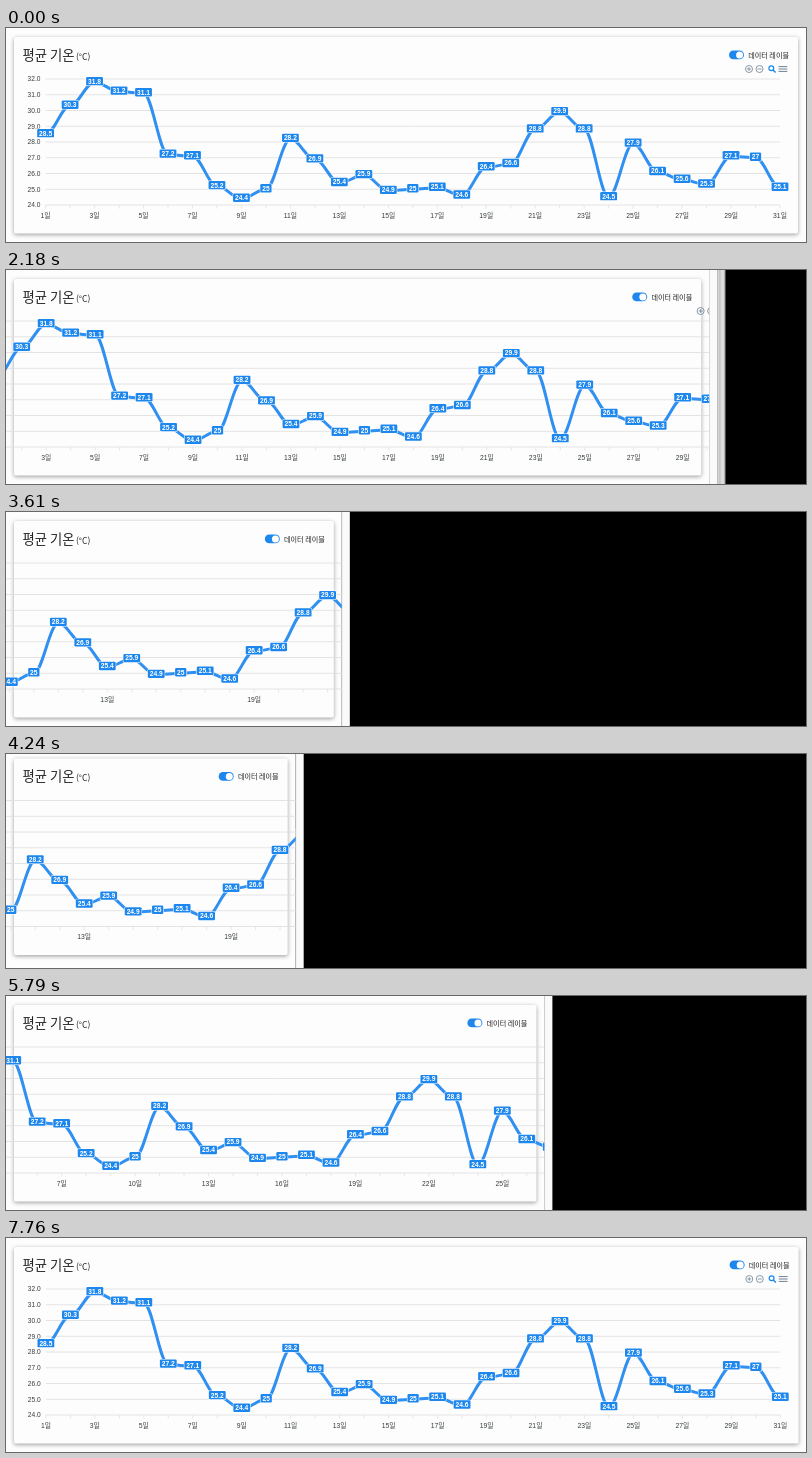
Animation, 800 px wide and 214 px high, one loop 7790 ms. Source, as an HTML page with a canvas:

```html
<!DOCTYPE html>
<html lang="ko">
<head>
<meta charset="utf-8">
<style>
html, body { margin: 0; width: 100%; height: 100%; overflow: hidden; background: #000; }
canvas { display: block; }
</style>
</head>
<body>
<canvas id="stage" width="800" height="214"></canvas>
<script>
const c = document.getElementById('stage').getContext('2d');
const LOOP = 7790, TAU = Math.PI * 2;
const SANS = '"Liberation Sans", "Noto Sans CJK KR", "Noto Sans CJK", sans-serif';
const KOREAN = '"Noto Sans CJK KR", "Noto Sans CJK", sans-serif';
const BLUE = '#1e87ee', GREY = '#6e8192';

const temps = [28.5, 30.3, 31.8, 31.2, 31.1, 27.2, 27.1, 25.2, 24.4, 25, 28.2, 26.9, 25.4, 25.9, 24.9, 25,
  25.1, 24.6, 26.4, 26.6, 28.8, 29.9, 28.8, 24.5, 27.9, 26.1, 25.6, 25.3, 27.1, 27, 25.1];
const STEP = 24.48;
const px = i => 39.6 + STEP * i;
const py = v => 177 - (v - 24) * 15.75;

// Right edge of the card over time: [ms, x]
const edge = [[0, 792], [820, 792], [1580, 762], [1700, 759], [2360, 659], [2670, 558], [3150, 474],
  [3610, 328], [3940, 289], [4350, 281], [4730, 284], [5090, 292], [5520, 429], [6300, 703],
  [6420, 722], [7080, 792.6], [LOOP, 792.6]];

// Monotone cubic interpolation
const slope = i => (edge[i + 1][1] - edge[i][1]) / (edge[i + 1][0] - edge[i][0]);
function tangent(i) {
  if (i === 0 || i === edge.length - 1) return 0;
  const a = slope(i - 1), b = slope(i);
  return a * b > 0 ? 2 * a * b / (a + b) : 0;
}
function edgeAt(t) {
  let i = 0;
  while (i < edge.length - 2 && t >= edge[i + 1][0]) i++;
  const [t0, a] = edge[i], [t1, b] = edge[i + 1], h = t1 - t0, s = (t - t0) / h;
  const ease = s * s * (3 - 2 * s);
  return a + (b - a) * ease + h * s * (1 - s) * ((1 - s) * tangent(i) - s * tangent(i + 1));
}

function rect(x, y, w, h, color) {
  c.fillStyle = color;
  c.fillRect(x, y, w, h);
}
function box(x, y, w, h, r, color) {
  c.fillStyle = color;
  c.beginPath();
  c.roundRect(x, y, w, h, r);
  c.fill();
}
function text(s, x, y, font, color, align = 'left') {
  c.font = font;
  c.fillStyle = color;
  c.textAlign = align;
  c.fillText(s, x, y);
}
function line(color, width, ...pts) {
  c.strokeStyle = color;
  c.lineWidth = width;
  c.beginPath();
  pts.forEach(([x, y]) => c.lineTo(x, y));
  c.stroke();
}
function ring(x, y, r, color, width) {
  c.strokeStyle = color;
  c.lineWidth = width;
  c.beginPath();
  c.arc(x, y, r, 0, TAU);
  c.stroke();
}

function card(right) {
  c.save();
  c.shadowColor = 'rgba(0,0,0,.38)';
  c.shadowBlur = 4;
  c.shadowOffsetY = 1.2;
  box(8, 9, right - 8, 196.5, 2, '#fdfdfd');
  c.restore();
  text('평균 기온', 16.5, 31.8, '500 13.3px ' + KOREAN, '#222');
  text('(°C)', 70, 31.5, '400 8.5px ' + KOREAN, '#222');
  box(right - 69, 22.6, 15, 8.6, 4.3, BLUE);
  c.fillStyle = '#fff';
  c.beginPath();
  c.arc(right - 58.4, 26.9, 3.5, 0, TAU);
  c.fill();
  text('데이터 레이블', right - 49.8, 29.5, '500 7.1px ' + KOREAN, '#222');
}

function toolbar() {
  for (const x of [743, 753.5]) {
    ring(x, 41, 3.5, GREY, 0.8);
    line(GREY, 0.8, [x - 1.9, 41], [x + 1.9, 41]);
  }
  line(GREY, 0.8, [743, 39.1], [743, 42.9]);
  ring(765.3, 40.2, 2.4, '#1688ee', 1.2);
  line('#1688ee', 1.4, [767, 41.9], [769.6, 44.4]);
  for (const y of [38.6, 41, 43.4]) line(GREY, 1, [772.5, y], [781.3, y]);
}

function chart(every) {
  for (let v = 24; v <= 32; v++) {
    line('#dedede', 0.8, [px(0), py(v)], [px(30), py(v)]);
    text(v.toFixed(1), 34.4, py(v) + 2.3, '6.6px ' + SANS, '#373d3f', 'right');
  }
  temps.forEach((v, i) => {
    line('#dedede', 0.7, [px(i), 177], [px(i), 180.5]);
    if (i % every === 0) text(i + 1 + '일', px(i), 189.8, '6.8px ' + SANS, '#373d3f', 'center');
  });

  c.strokeStyle = '#3090f1';
  c.lineWidth = 3;
  c.beginPath();
  c.moveTo(px(0), py(temps[0]));
  for (let i = 1; i < temps.length; i++) {
    const pull = STEP * 0.35, y = py(temps[i]);
    c.bezierCurveTo(px(i - 1) + pull, py(temps[i - 1]), px(i) - pull, y, px(i), y);
  }
  c.stroke();

  temps.forEach((v, i) => {
    c.font = 'bold 6.7px ' + SANS;
    const w = c.measureText(v).width + 3.8, x = px(i), y = py(v) - 1;
    box(x - w / 2 - 0.5, y - 4.7, w + 1, 9.4, 1.5, '#fff');
    box(x - w / 2, y - 4.2, w, 8.4, 1.2, BLUE);
    text(v, x, y + 2.4, 'bold 6.7px ' + SANS, '#fff', 'center');
  });
  toolbar();
}

function draw(t) {
  const right = edgeAt(t), page = right + 8;
  const wide = right > 585;
  const every = wide ? 2 : right > 360 ? 3 : 6;

  rect(0, 0, 800, 214, '#000');
  if (wide) {
    rect(page + 8, 0, 8, 214, '#dcdcdc');
    rect(page + 9.5, 0, 2, 214, '#c4c4c4');
    rect(page + 15, 0, 1, 214, '#a8a8a8');
  }
  rect(page, 0, 8, 214, '#fafafa');
  rect(page, 0, 0.7, 214, '#e2e2e2');

  c.save();
  c.beginPath();
  c.rect(0, 0, page, 214);
  c.clip();
  rect(0, 0, page, 214, '#fdfdfd');
  if (right < 310) c.translate(0, -4.5);
  card(right);
  // The chart keeps its width and stays centred in the card
  c.translate((right - 792) / 2, 0);
  chart(every);
  c.restore();
}

const start = performance.now();
function frame() {
  draw((performance.now() - start) % LOOP);
  requestAnimationFrame(frame);
}
frame();
</script>
</body>
</html>
```
